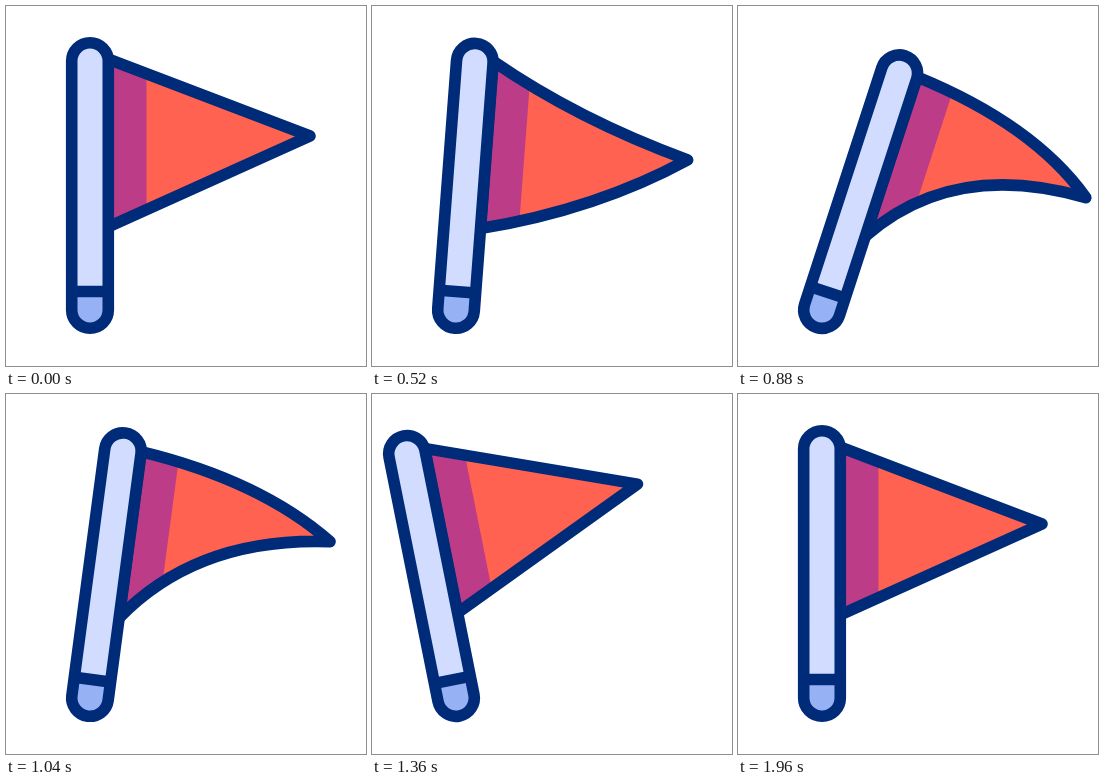
An HTML page for the animation above (2 s loop, 360 by 360 pixels).

```html
<!DOCTYPE html>
<html lang="en">
<head>
<meta charset="utf-8">
<title>Waving flag</title>
<style>
  html, body { margin: 0; width: 100%; height: 100%; overflow: hidden; background: #fff; }
  svg { display: block; width: 100%; height: 100%; }
  .line { fill: none; stroke: #002b78; stroke-width: 11.6; stroke-linejoin: round; }
</style>
</head>
<body>
<svg viewBox="0 0 360 360">
  <defs>
    <clipPath id="clothClip"><path class="cloth"/></clipPath>
    <clipPath id="poleClip"><rect x="65.7" y="36.7" width="36.6" height="285.6" rx="18.3"/></clipPath>
  </defs>
  <g id="flag">
    <path class="cloth" fill="#ff6250"/>
    <rect x="100" y="30" width="40.5" height="220" fill="#bc3c87" clip-path="url(#clothClip)"/>
    <path class="cloth line"/>
    <g clip-path="url(#poleClip)">
      <rect x="60" y="30" width="48" height="256" fill="#d1dcff"/>
      <rect x="60" y="285.5" width="48" height="43" fill="#96b2f4"/>
    </g>
    <path class="line" d="M66 285.5H102"/>
    <rect class="line" x="65.7" y="36.7" width="36.6" height="285.6" rx="18.3"/>
  </g>
</svg>
<script>
const LOOP = 2000, STEP = 40;

const flag = document.getElementById("flag");
const cloths = document.querySelectorAll(".cloth");

// Eased move between [time, value] key points
function ease(time, ...keys) {
  const next = keys.findIndex(key => key[0] > time);
  if (next < 0) return keys.at(-1)[1];
  const [t0, from] = keys[next - 1], [t1, to] = keys[next];
  const p = (time - t0) / (t1 - t0);
  return from + (to - from) * p * p * (3 - 2 * p);
}

// Triangle whose edges sag (bend > 0) or arch (bend < 0); the top edge and tip arch less
function clothPath(bend) {
  const top = bend + 0.22 * bend * bend;
  const tip = `${304 - 3 * bend * bend} ${130 + 17 * top}`;
  return `M102 53Q${203 - 29 * top} ${91.5 + 34 * top} ${tip}` +
    `Q${203 + 36 * bend} ${175.5 + 48 * bend} 102 221Z`;
}

function draw() {
  const time = Math.floor(performance.now() % LOOP / STEP) * STEP;
  const tilt = ease(time, [0, 0], [290, -10.2], [770, 20.8], [1385, -11.5], [1970, 0]);
  const bend = ease(time, [0, 0], [300, 1], [920, -1.18], [1340, 0]);
  cloths.forEach(cloth => cloth.setAttribute("d", clothPath(bend)));
  flag.setAttribute("transform", `rotate(${tilt} 84 304)`);
  requestAnimationFrame(draw);
}
draw();
</script>
</body>
</html>
```
